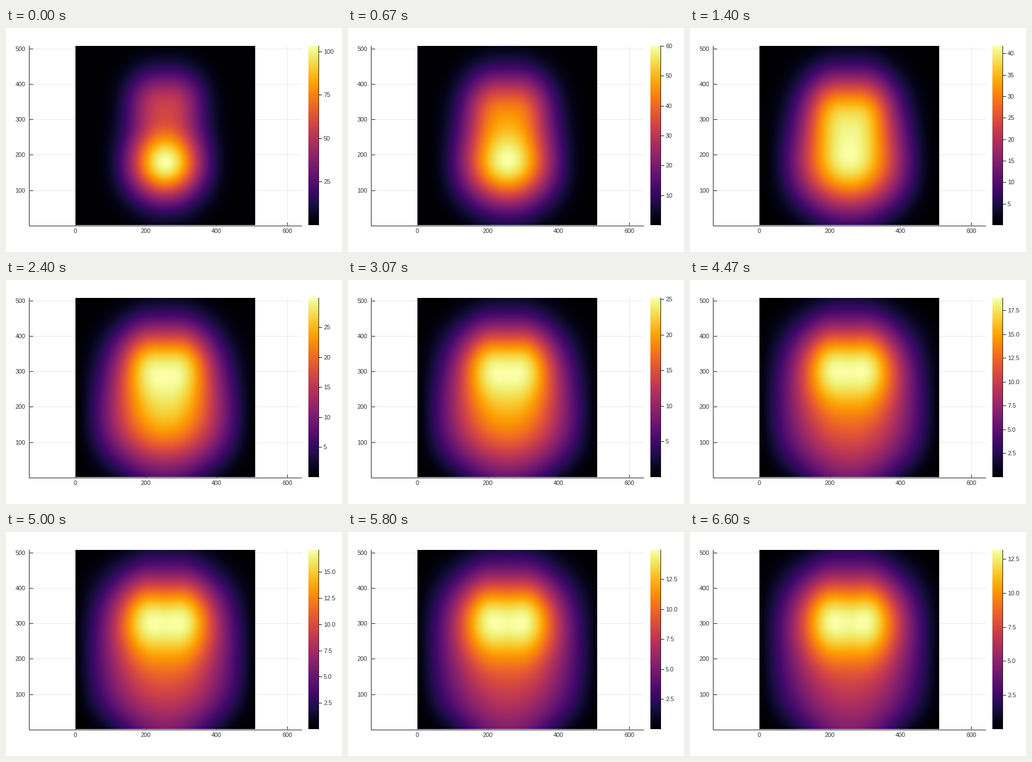
A matplotlib script for the animation above (6.67 s loop, 600 by 400 pixels).

```python
import numpy as np
import matplotlib.pyplot as plt
from matplotlib.animation import FuncAnimation

# The plot is redrawn every STEP_MS; the simulation itself has STATES states
LOOP_MS, STEP_MS, STATES = 6670, 29, 100
PX = 0.72  # points per pixel at 100 dpi
LEFT, RIGHT, TOP, BOTTOM = 124, 445, 32, 352
INK, TEXT, GRID = "#1a1a1a", "#2c2c2c", "#e8e8e8"

plt.rcParams["font.family"] = "Liberation Sans"

y = np.arange(TOP, BOTTOM)[:, None] + 0.5
x = np.arange(LEFT, RIGHT)[None, :] + 0.5 - 285
wall = np.cos(np.pi / 2 * np.clip(x / 161, -1, 1))  # cold left and right walls
edge = np.exp((TOP - y) / 25) + np.exp((y - BOTTOM) / 25)
r2 = (x / 48) ** 2
pair = r2 * np.exp(1 - r2)


def bell(v, mid, sigma):
    return np.exp(-0.5 * ((v - mid) / sigma) ** 2)


def field(n):
    """Relative heat: a spreading hot spot plus a slow plateau above it."""
    s, root = n / (STATES - 1), np.sqrt(n)
    spot = bell(y, 241 + 0.14 * n, 47 + 0.68 * n)
    spot = spot * wall ** (1 + 3.5 * np.exp(-n / 16))
    slab = bell(y, 130 + 2 * root, 40 + 1.55 * root)
    slab = slab * np.exp(-np.abs(x / (68 + 3 * root)) ** 2.6)
    slab = slab * (1 + 0.13 * np.sqrt(s) * pair)
    u = (spot + (0.47 + 0.8 * s ** 0.85) * slab) * wall ** (1.6 * edge)
    return u / u.max()


def peak(n):
    """Hottest value, falling roughly as 1 / time."""
    return 1 / np.polyval([1.7e-8, -2.16e-6, 7.15e-4, 9.66e-3], n)


def tick_step(top):
    if top > 100:
        return 25
    if top > 50:
        return 10
    return 5 if top > 25 else 2.5


fig = plt.figure(figsize=(6, 4), dpi=100, facecolor="white")
ax = fig.add_axes([0, 0, 1, 1])


def line(xs, ys, color=INK, z=1):
    return ax.plot(xs, ys, color=color, lw=PX, zorder=z,
                   solid_capstyle="butt")[0]


def label(px, py, s, ha):
    return ax.text(px, py + 4, s, ha=ha, va="baseline", fontsize=7.8,
                   color=TEXT)


def picture(data, left, right):
    return ax.imshow(data, cmap="inferno", vmin=0, vmax=1, zorder=3,
                     extent=(left, right, BOTTOM, TOP),
                     interpolation="nearest")


for v in range(100, 501, 100):
    py = 352.72 - 0.6312 * v
    line([42, 528], [py, py], GRID, 0)
    line([42, 48], [py, py])
    label(34.7, py, str(v), "right")
for v in range(0, 601, 200):
    px = 123.6 + 0.6314 * v
    line([px, px], [TOP, BOTTOM], GRID, 0)
    line([px, px], [347, BOTTOM])
    label(px, 362, str(v), "center")
line([41, 41], [31, 353], z=4)
line([41, 528], [353, 353], z=4)

heat = picture(field(0), LEFT, RIGHT)
picture(np.linspace(1, 0, BOTTOM - TOP)[:, None], 540, 558)
line([558, 558], [31, BOTTOM], z=4)

marks = [line([558, 564], [0, 0], z=4) for _ in range(10)]
names = [label(567, 0, "", "left") for _ in range(10)]

ax.set(xlim=(0, 600), ylim=(400, 0), aspect="auto")
ax.axis("off")


def draw(k):
    n = min(int((k + 1) * STEP_MS * STATES / LOOP_MS), STATES - 1)
    heat.set_data(field(n))
    top = peak(n)
    step = tick_step(top)
    for i, (mark, name) in enumerate(zip(marks, names), 1):
        v = i * step
        shown = v <= top
        mark.set_visible(shown)
        name.set_visible(shown)
        if shown:
            py = BOTTOM - 321 * v / top
            mark.set_ydata([py, py])
            name.set_y(py + 4)
            name.set_text(f"{v:.1f}" if step == 2.5 else f"{v:d}")
    return [heat, *marks, *names]


anim = FuncAnimation(fig, draw, frames=LOOP_MS // STEP_MS, interval=STEP_MS,
                     repeat=True, repeat_delay=0, blit=False)
plt.show()
```
